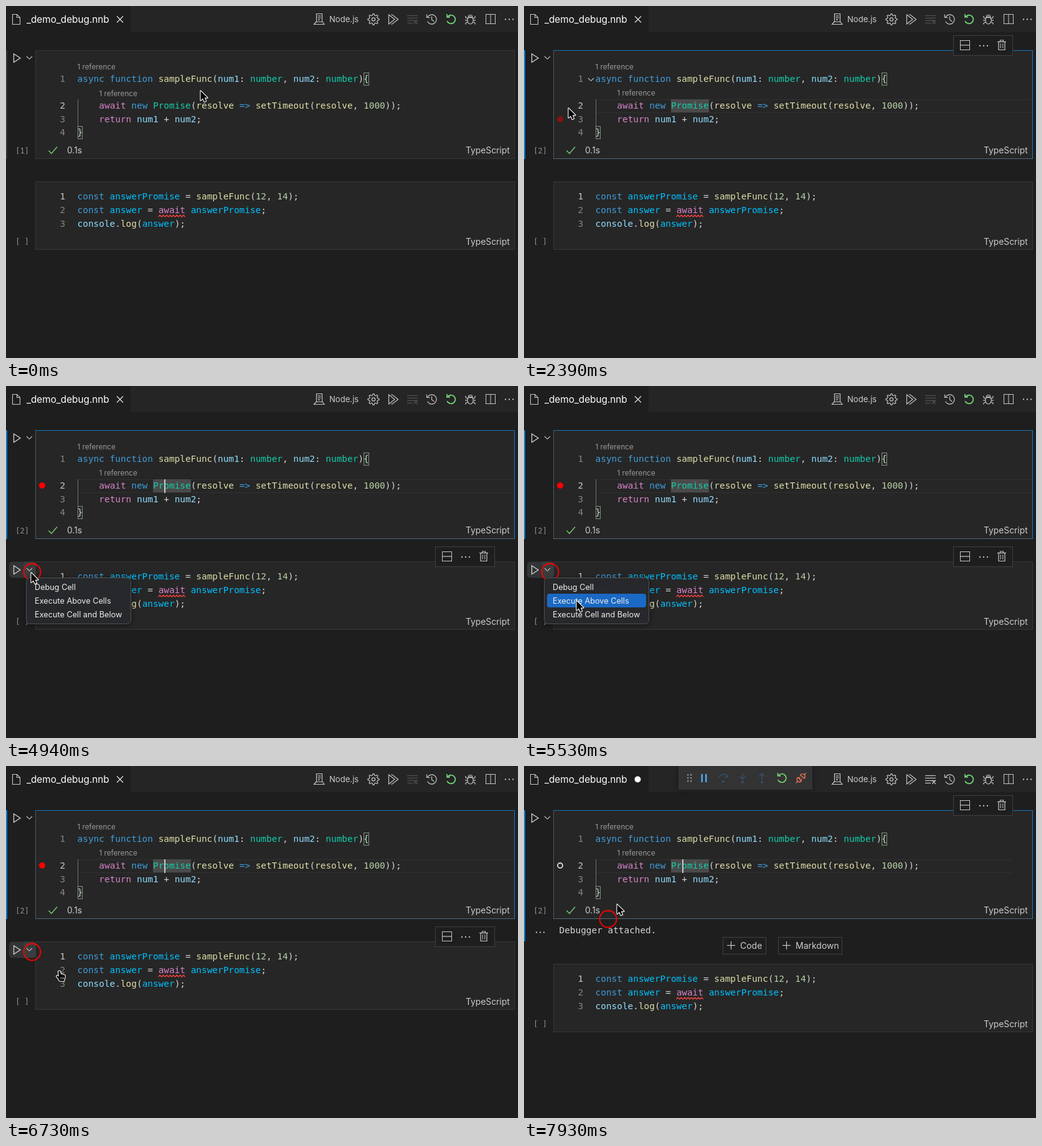
An HTML page with a canvas that plays this animation: 822x566 px, repeating every 8 s.

```html
<!DOCTYPE html>
<html lang="en">
<head>
<meta charset="utf-8">
<title>Notebook debugging</title>
<style>
html, body { margin: 0; width: 100%; height: 100%; overflow: hidden; background: #1e1e1e; }
canvas { display: block; width: 822px; height: 566px; }
</style>
</head>
<body>
<canvas id="stage" width="822" height="566"></canvas>
<script>
const g = document.getElementById('stage').getContext('2d');
const LOOP = 8000;
const UI = 'Inter, "Open Sans", sans-serif';
const MONO = '"DejaVu Sans Mono", monospace';
const CHAR = 14.4 * 0.602;
const C = {
  bg: '#1e1e1e', bar: '#252526', cell: '#262626', edge: '#37373a', text: '#d4d4d4',
  icon: '#c5c5c5', dim: '#858585', blue: '#3f9dda', teal: '#12ceac', name: '#8fdeff',
  constant: '#00c1ff', pink: '#d783c7', func: '#dedda8', num: '#b8d0a6',
  focus: '#0a7fd6', green: '#75d075', red: '#f00', white: '#fff'
};

// Pointer states, each held until the next one: time, shape, x, y.
const POINTER = [
  [0, 'arrow', 312, 136], [150, 'beam', 272, 157], [300, 'beam', 252, 163],
  [740, 'beam', 222, 156], [890, 'arrow', 105, 124], [1040, 'hand', 22, 92],
  [1190, 'hand', 17, 89], [1790, 'arrow', 28, 112], [1940, 'arrow', 45, 152],
  [2090, 'arrow', 62, 177], [2240, 'arrow', 68, 175], [2390, 'arrow', 71, 164],
  [2540, 'arrow', 68, 164], [2690, 'arrow', 62, 165], [2840, 'arrow', 58, 165],
  [4040, 'arrow', 60, 190], [4190, 'arrow', 55, 222], [4340, 'arrow', 44, 270],
  [4490, 'hand', 37, 293], [4940, 'arrow', 40, 300], [5090, 'arrow', 55, 317],
  [5240, 'arrow', 70, 332], [5390, 'arrow', 82, 343], [5530, 'arrow', 84, 345],
  [6580, 'hand', 85, 329], [7630, 'arrow', 105, 296], [7780, 'arrow', 136, 246],
  [7930, 'arrow', 149, 222]
];
// Click rings: start, end, x, y.
const RINGS = [
  [590, 740, 254, 164], [1490, 1640, 18, 91], [3140, 3290, 60, 164],
  [4640, 7630, 42, 299], [7630, 7780, 88, 328], [7780, 7930, 118, 272], [7930, 8000, 135, 246]
];
const CARET = [[590, 1190], [1640, 2090], [2540, 3140], [3590, 4190], [4640, 5090],
  [5680, 6130], [6580, 7180], [7630, 8000]];

const within = (t, a, b) => t >= a && t < b;

function text(s, x, y, color, size = 14, font = UI) {
  g.font = `${size}px ${font}`;
  g.fillStyle = color;
  g.fillText(s, x, y);
}
function code(x, y, ...parts) {
  for (const [s, color = C.text] of parts) {
    text(s, x, y + 5, color, 14.4, MONO);
    x += s.length * CHAR;
  }
}
function fill(x, y, w, h, color) {
  g.fillStyle = color;
  g.fillRect(x, y, w, h);
}
function box(x, y, w, h, color, back) {
  if (back) fill(x, y, w, h, back);
  g.strokeStyle = color;
  g.lineWidth = 1;
  g.strokeRect(x + .5, y + .5, w - 1, h - 1);
}
function pill(x, y, w, h, r, color) {
  g.beginPath();
  g.roundRect(x, y, w, h, r);
  g.fillStyle = color;
  g.fill();
}
function line(points, color = C.icon, width = 1.2, close = false) {
  g.beginPath();
  for (let i = 0; i < points.length; i += 2) g.lineTo(points[i], points[i + 1]);
  if (close) g.closePath();
  g.strokeStyle = color;
  g.lineWidth = width;
  g.stroke();
}
function arc(x, y, r, color, width = 1.2, a = 0, b = Math.PI * 2) {
  g.beginPath();
  g.arc(x, y, r, a, b);
  g.strokeStyle = color;
  g.lineWidth = width;
  g.stroke();
}
function dot(x, y, r, color) {
  g.beginPath();
  g.arc(x, y, r, 0, Math.PI * 2);
  g.fillStyle = color;
  g.fill();
}
function dots(x, y, color = C.icon) {
  for (let i = -1; i < 2; i++) dot(x + i * 6, y, 1.15, color);
}
const chevron = (x, y) => line([x - 4.5, y - 2, x, y + 2.3, x + 4.5, y - 2], C.icon, 1.1);

function restart(x, y, color, width) {
  arc(x, y + .5, 6.8, color, width, -2.45, 2.75);
  line([x - 6.5, y - 8, x - 6.5, y - 3.2, x - 1.7, y - 3.2], color, width);
}
function gear(x, y) {
  const points = [];
  for (let i = 0; i < 32; i++) {
    const r = i % 4 < 2 ? 9 : 6.6, a = (i - .5) * Math.PI / 16;
    points.push(x + r * Math.cos(a), y + r * Math.sin(a));
  }
  line(points, C.icon, 1.2, true);
  arc(x, y, 2.6, C.icon, 1.3);
}
function clearIcon(color) {
  for (const y of [15.5, 19.5, 23.5]) line([644, y, 661, y], color, 1.2);
  line([644, 27.5, 653, 27.5], color, 1.2);
  line([655, 23, 661, 29], color, 1.1);
  line([661, 23, 655, 29], color, 1.1);
}
function bug(x, y) {
  g.beginPath();
  g.ellipse(x, y + 2, 4.7, 6, 0, 0, Math.PI * 2);
  g.strokeStyle = C.icon;
  g.lineWidth = 1.2;
  g.stroke();
  arc(x, y - 3.2, 3.3, C.icon, 1.2, Math.PI, Math.PI * 2);
  line([x - 4, y - 2.5, x + 4, y - 2.5]);
  for (const s of [-1, 1]) {
    line([x + s * 8, y - 5, x + s * 7, y - 2, x + s * 4.5, y - 1]);
    line([x + s * 8.5, y + 2, x + s * 4.7, y + 2]);
    line([x + s * 8, y + 8.5, x + s * 7, y + 6, x + s * 4, y + 5]);
  }
}

function header(dirty, active) {
  fill(0, 0, 822, 42, C.bar);
  fill(0, 0, 200, 42, C.bg);
  line([10.5, 13.5, 17.5, 13.5, 22.5, 18.5, 22.5, 29.5, 10.5, 29.5], C.icon, 1.1, true);
  line([17.5, 13.5, 17.5, 18.5, 22.5, 18.5], C.icon, 1.1);
  text('_demo_debug.nnb', 33, 27, C.white, 15.3);
  if (dirty) dot(182.5, 21.5, 5, C.white);
  else {
    line([178, 16.5, 188, 26.5], '#e0e0e0', 1.3);
    line([188, 16.5, 178, 26.5], '#e0e0e0', 1.3);
  }

  line([498.5, 25, 498.5, 12.5, 507.5, 12.5, 507.5, 25]);
  line([500.5, 16, 505.5, 16]);
  line([500.5, 19, 505.5, 19]);
  fill(501, 21.5, 3, 1.5, C.icon);
  line([498, 25.5, 494.5, 29.5, 511, 29.5, 508, 25.5], C.icon, 1.2, true);
  text('Node.js', 519, 25.5, '#cccccc', 13.1);
  gear(590, 21.5);
  line([614.5, 14, 614.5, 29, 624, 21.5], C.icon, 1.2, true);
  line([618, 14, 620, 14, 629.5, 21.5, 620, 29, 618, 29]);
  clearIcon(active ? C.icon : '#515152');
  arc(683.5, 21.5, 7.6, C.icon, 1.2, -2.7, 2.7);
  line([675.5, 13.5, 675.5, 18.5, 680.5, 18.5]);
  line([683.5, 16.5, 683.5, 22, 687.5, 25]);
  restart(714.5, 21, C.green, 1.8);
  bug(745.5, 21);
  box(770, 13, 16, 16, C.icon);
  line([778, 13, 778, 29], C.icon, 1);
  dots(808, 21.5);
}

function debugBar(running) {
  g.save();
  g.shadowColor = 'rgba(0,0,0,.4)';
  g.shadowBlur = 8;
  fill(248, 0, 215, 38, '#333333');
  g.restore();
  for (const x of [263, 268]) for (const y of [14, 19, 24]) fill(x - 1, y - 1, 2.4, 2.4, '#8a8a8a');
  const pause = running ? '#52adff' : '#35526c', step = '#36506a';
  fill(284.5, 13, 2.4, 13, pause);
  fill(291, 13, 2.4, 13, pause);
  arc(320, 20, 6.8, step, 1.5, Math.PI * 1.08, Math.PI * 1.88);
  line([327.3, 13, 327.3, 18, 322, 18], step, 1.5);
  dot(320, 25, 2, step);
  line([351, 11.5, 351, 21], step, 1.5);
  line([346, 16.5, 351, 21.5, 356, 16.5], step, 1.5);
  dot(351, 26, 2, step);
  line([382, 22, 382, 12], step, 1.5);
  line([377, 17, 382, 12, 387, 17], step, 1.5);
  dot(382, 26, 2, step);
  restart(414, 19, C.green, 1.7);
  g.save();
  g.translate(444.5, 19.5);
  g.rotate(-Math.PI / 4);
  g.strokeStyle = '#f0755f';
  g.lineWidth = 1.4;
  g.beginPath();
  g.moveTo(-11, 0); g.lineTo(-7.5, 0);
  g.moveTo(-2.5, -4); g.arc(-3, 0, 4.2, -Math.PI / 2, Math.PI / 2, true); g.closePath();
  g.moveTo(-2.5, -2); g.lineTo(.5, -2); g.moveTo(-2.5, 2); g.lineTo(.5, 2);
  g.moveTo(3, -4); g.arc(3.5, 0, 4.2, -Math.PI / 2, Math.PI / 2); g.closePath();
  g.moveTo(8, 0); g.lineTo(11.5, 0);
  g.stroke();
  g.restore();
}

function cellTools(y) {
  box(689, y, 96, 33, '#404040', C.bg);
  box(700, y + 8, 16, 16, C.icon);
  line([700, y + 16, 716, y + 16]);
  dots(738, y + 17);
  line([760, y + 10.5, 774, y + 10.5]);
  line([764.5, y + 10, 764.5, y + 8, 769.5, y + 8, 769.5, y + 10]);
  line([762, y + 11, 762, y + 23.5, 772, y + 23.5, 772, y + 11]);
  for (const x of [765.2, 768.8]) line([x, y + 13, x, y + 21], C.icon, 1);
}

function runButton(y, hover) {
  if (hover) {
    pill(5, y - 13, 43, 26, 5, '#333435');
    pill(29, y - 13, 19, 26, [0, 5, 5, 0], '#3b3c3d');
  }
  line([12.5, y - 6.5, 12.5, y + 7, 23, y + .2], '#d0d0d0', 1.3, true);
  chevron(37.5, y - .5);
}

function lineNumber(n, y, active) {
  text(n, 86.5, y + 5, active ? '#c6c6c6' : C.dim, 14.4, MONO);
}

function firstCell(t) {
  const focused = t >= 590, attached = t >= 7630;
  fill(0, 71, 2, attached ? 211 : 175, focused ? C.focus : C.edge);
  box(47, 71, 770, 175, C.edge, C.cell);
  if (focused) {
    fill(47, 71, 770, 1, '#1273b8');
    fill(816, 71, 1, 175, C.focus);
    fill(47, 71, 1, 175, '#4b5762');
    fill(47, 245, 770, 1, '#53687a');
    const w = attached ? 669 : 701;
    fill(115, 150, w, 1, '#303030');
    fill(115, 171, w, 1, '#303030');
    fill(236, 150, 61, 21, '#4a4a4a');
  }
  runButton(83.5, within(t, 1040, 1790));
  text('1 reference', 114.5, 101.5, '#999999', 11.7);
  text('1 reference', 149.5, focused ? 143.5 : 144.5, '#999999', 11.7);
  [117, 160, 182, 203].forEach((y, i) => lineNumber(i + 1, y, i === 1));
  if (within(t, 2090, 4340)) chevron(107.5, 118);

  fill(115, 150, 1, 44, '#6f6f6f');
  box(574, 107, 9, 21, '#888888', '#213021');
  box(115, 193, 8, 21, '#888888', '#213021');
  code(114.6, 117, ['async function ', C.blue], ['sampleFunc', C.func], ['('], ['num1', C.name], [': '],
    ['number', C.teal], [', '], ['num2', C.name], [': '], ['number', C.teal], ['){']);
  code(149.3, 160, ['await ', C.pink], ['new ', C.blue], ['Promise', C.teal], ['('], ['resolve', C.func],
    [' => ', C.blue], ['setTimeout', C.func], ['('], ['resolve', C.func], [', '], ['1000', C.num], ['));']);
  code(149.3, 182, ['return ', C.pink], ['num1', C.name], [' + '], ['num2', C.name], [';']);
  code(114.6, 203, ['}']);

  if (CARET.some(([a, b]) => within(t, a, b))) fill(254, 150, 2, 22, '#c8c8c6');
  if (within(t, 2090, 2540)) dot(58, 182, 5, '#811411');
  if (within(t, 2540, 3740)) dot(58, 160, 5, '#811411');
  if (within(t, 3740, 7480)) dot(58, 160, 5, C.red);
  if (t >= 7480) arc(58, 160, 4, '#d8d8d8', 1.8);

  text(t < 1640 ? '[1]' : '[2]', 15.2, 237, '#909090', 12, MONO);
  line([68.5, 232.5, 73, 237.2, 82, 226.5], C.green, 1.4);
  text('0.1s', 98, 237, '#cccccc', 13.8);
  text('TypeScript', 738, 237, '#cccccc', 13.8);
  if (within(t, 590, 4340) || t >= 7780) cellTools(47);
}

function secondCell(t) {
  const y = t >= 7630 ? 318 : 282;
  const hover = within(t, 4340, 7630);
  box(47, y, 770, 110, C.edge, C.cell);
  if (hover) runButton(y + 13.5, t >= 4490);
  [24, 46, 68].forEach((d, i) => lineNumber(i + 1, y + d, i === 0));
  code(114.6, y + 24, ['const ', C.blue], ['answerPromise', C.constant], [' = '], ['sampleFunc', C.func],
    ['('], ['12', C.num], [', '], ['14', C.num], [');']);
  code(114.6, y + 46, ['const ', C.blue], ['answer', C.constant], [' = '], ['await', C.pink],
    [' '], ['answerPromise', C.constant], [';']);
  code(114.6, y + 68, ['console', C.name], ['.'], ['log', C.func], ['('], ['answer', C.constant], [');']);
  const wave = [];
  for (let i = 0; i <= 16; i++) wave.push(244.5 + i * 2.7, y + (i % 2 ? 54.2 : 57));
  line(wave, '#f5423f', 1.3);
  text('[ ]', 15.2, y + 101, '#909090', 12, MONO);
  text('TypeScript', 738, y + 102, '#cccccc', 13.8);
  if (hover) cellTools(258);
}

function output(t) {
  dots(26, 267.5);
  code(56.5, 264, ['Debugger attached.']);
  if (t < 7780) return;
  for (const [x, w, label] of [[319, 70, 'Code'], [408, 103, 'Markdown']]) {
    box(x, 275, w, 28, '#414141', C.bg);
    line([x + 7, 288.5, x + 20, 288.5]);
    line([x + 13.5, 282, x + 13.5, 295]);
    text(label, x + 28, 294, '#cccccc', 14);
  }
}

function menu(t) {
  g.save();
  g.shadowColor = 'rgba(0,0,0,.5)';
  g.shadowBlur = 8;
  g.shadowOffsetY = 2;
  pill(32.5, 308.5, 168, 74, 6, 'rgba(40,41,44,.97)');
  g.restore();
  g.beginPath();
  g.roundRect(32.5, 308.5, 168, 74, 6);
  g.strokeStyle = '#505255';
  g.lineWidth = 1;
  g.stroke();
  const pick = t < 5090 ? -1 : t < 5240 ? 0 : 1;
  ['Debug Cell', 'Execute Above Cells', 'Execute Cell and Below'].forEach((s, i) => {
    const y = 323 + i * 22;
    if (i === pick) pill(37, y - 11, 159, 22, 4, '#1a69c4');
    text(s, 46, y + 5, '#ededed', 12.7);
  });
}

const ARROW = new Path2D('M0 0V15.2L3.5 12L6 17.6L8.6 16.5L6.2 11.1H11Z');
const HAND = new Path2D('M-1.5 1Q0 -1 1.5 1L2.6 5.5Q4 4.3 5 6Q6.5 5 7.2 6.7Q9.3 6 9.3 8.5L8.7 12.5L7.5 16.2H.8' +
  'L-1.8 12.3L-4.2 9.2Q-4.6 7 -2.2 7.8L-.4 9.3Z');

function pointer(t) {
  const [, shape, x, y] = POINTER.findLast(p => p[0] <= t);
  if (shape === 'beam') {
    for (const [color, w] of [['#1a1a1a', 3], ['#f2f2f2', 1.2]]) {
      line([x, y - 8, x, y + 8], color, w);
      line([x - 3, y - 9, x, y - 7.5, x + 3, y - 9], color, w);
      line([x - 3, y + 9, x, y + 7.5, x + 3, y + 9], color, w);
    }
    return;
  }
  const path = shape === 'hand' ? HAND : ARROW;
  g.save();
  g.translate(x + .5, y + .5);
  g.lineJoin = 'round';
  g.strokeStyle = C.white;
  g.fillStyle = '#000';
  g.lineWidth = 2.2;
  g.stroke(path);
  g.fill(path);
  if (shape === 'hand') for (const d of [2.4, 4.6, 6.8]) line([d, 10, d + .3, 13.5], '#ddd', .8);
  g.restore();
}

function draw(t) {
  fill(0, 0, 822, 566, C.bg);
  header(t >= 7480, t >= 7480);
  if (t >= 6880) debugBar(t >= 7480);
  firstCell(t);
  secondCell(t);
  if (t >= 7630) output(t);
  for (const [a, b, x, y] of RINGS) if (within(t, a, b)) arc(x, y, 13.5, C.red, 1.8);
  if (within(t, 4790, 6580)) menu(t);
  pointer(t);
}

const start = performance.now();
function tick() {
  draw((performance.now() - start) % LOOP);
  requestAnimationFrame(tick);
}
tick();
</script>
</body>
</html>
```
